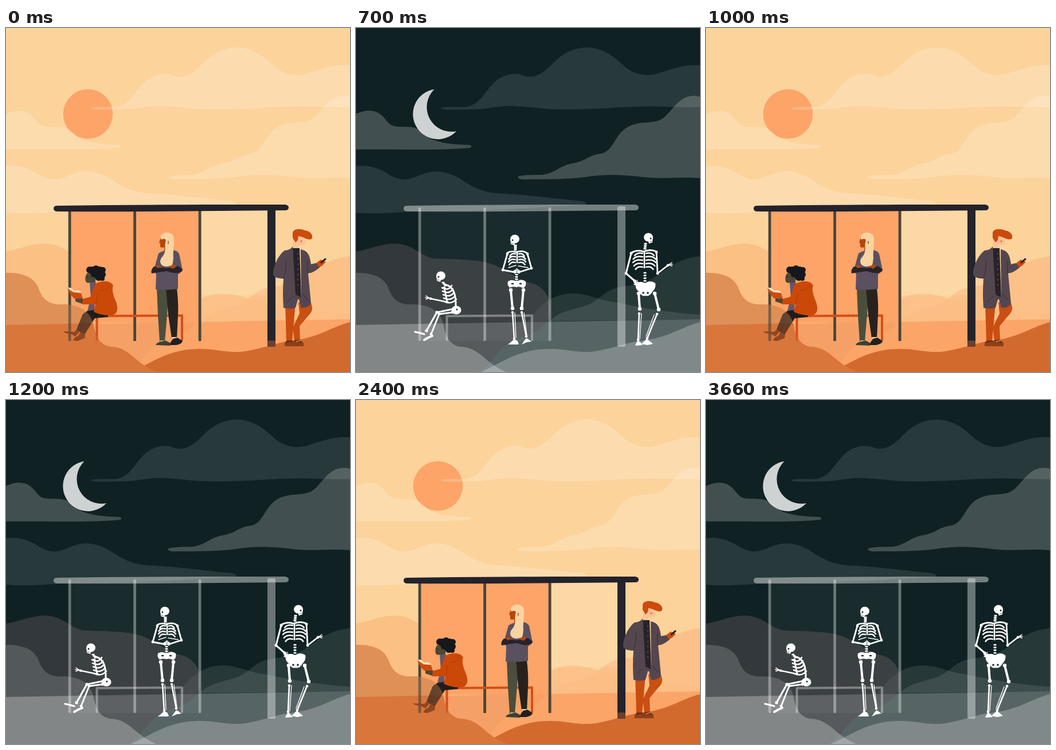
Animation of 600x600 px, one loop 3.76 s. Source, as an HTML page:

```html
<!DOCTYPE html>
<html lang="en">
<head>
<meta charset="utf-8">
<title>Bus stop, day and night</title>
<style>
  html, body { margin: 0; width: 100%; height: 100%; overflow: hidden; background: #fbd39b; }
  svg { display: block; width: 100vw; height: 100vh; }
</style>
</head>
<body>
<svg id="stage" viewBox="0 0 600 600"><g id="day"></g><g id="night"></g></svg>
<script>
const land = {
  cloudA: 'M148 139Q165 137 190 138C215 135 222 115 238 98C252 82 275 76 292 83C312 90 328 78 345 60C365 40 385 34 405 34C435 35 455 55 472 70C490 83 510 85 530 78C555 70 575 63 600 65V138C560 139 530 136 500 137C450 138 420 142 370 142C330 143 300 136 265 136C240 137 225 143 190 142Q148 144 148 139Z',
  cloudB: 'M282 260Q285 256 325 256C348 253 355 240 378 236C402 232 406 221 428 219C448 215 450 190 470 175C490 162 508 167 526 162C545 157 552 132 575 121Q588 116 600 120V262C570 259 540 264 500 260C460 255 430 255 400 260C370 264 330 264 300 264Q282 265 282 260Z',
  cloudC: 'M0 150C15 143 30 142 42 150C55 160 55 172 75 172C90 173 105 170 118 183C130 200 165 203 198 204Q204 206 199 209C150 214 60 211 0 212Z',
  cloudD: 'M0 241C20 238 40 244 55 254C75 267 90 267 110 257C135 247 155 248 180 262C205 278 220 288 260 289C300 291 350 298 395 302Q404 305 401 308C320 313 220 320 120 319C80 320 40 326 0 322Z',
  farLeft: 'M0 390C25 386 45 375 70 376C102 378 112 398 135 402C170 404 205 402 235 411C272 425 280 440 306 445C332 452 340 475 339 495C335 530 295 535 270 548C245 560 240 585 215 600H0Z',
  farRight: 'M338 512C350 496 375 492 395 486C425 478 432 456 460 452C490 448 505 445 525 432C550 414 565 402 600 398V508Z',
  midRight: 'M300 512C320 482 345 463 378 463C405 463 420 474 450 478C500 488 540 496 600 500V508Z',
  ground: 'M0 518L600 508V600H0Z',
  slope: 'M332 513C320 535 295 535 270 548C245 560 240 585 215 600H0V518Z',
  nearLeft: 'M0 427C25 427 47 432 56 452C65 480 82 483 100 482C125 482 146 492 152 515C156 540 165 553 182 556C215 556 225 585 262 600H0Z',
  nearLeftLow: 'M0 518L152 515C156 540 165 553 182 556C215 556 225 585 262 600H0Z',
  front: 'M218 600C255 584 280 562 330 560C360 558 380 566 408 565C440 562 465 550 495 546C545 541 570 520 600 513V600Z'
};

const fill = (d, color, opacity = 1) => `<path d="${d}" fill="${color}" fill-opacity="${opacity}"/>`;
const line = (d, color, width, opacity = 1) =>
  `<path d="${d}" fill="none" stroke="${color}" stroke-width="${width}" stroke-opacity="${opacity}" stroke-linecap="round" stroke-linejoin="round"/>`;
const dot = (x, y, rx, color, ry = rx) =>
  `<ellipse cx="${x}" cy="${y}" rx="${rx}" ry="${ry}" fill="${color}"/>`;
const box = (x, y, w, h, color, opacity = 1, r = 0) =>
  `<rect x="${x}" y="${y}" width="${w}" height="${h}" rx="${r}" fill="${color}" fill-opacity="${opacity}"/>`;
const layers = list => list.map(([name, color, opacity]) => fill(land[name], color, opacity)).join('');

const roof = 'M89 310C220 308 360 308 487 308Q493 309 493 313Q493 318 487 318C360 319 220 321 90 320Q83 320 83 315Q83 310 89 310Z';
const bench = 'M158.500 544V502.500L307 501.500V544';
const posts = [111, 224.500, 338];

// Daytime people
function reader() {
  const skin = '#4b4935', hair = '#17181b', coat = '#cb4908';
  const curls = [[163, 424, 8], [157, 420, 6], [168, 430, 6], [162, 434, 7], [169, 422, 5], [146, 422, 6], [151, 423, 7], [153, 430, 5], [168, 437, 4]];
  return fill('M176 490L146 492Q133 496 131 506L123 526L130 531L147 507L178 504Z', '#1f1c1b')
    + fill('M146 498L130 530L137 535L155 506Z', '#2b1c18')
    + fill('M100 529L119 530L123 526L128 530L121 538L112 533Q102 533 100 529Z', '#6b2c14')
    + fill('M117 545Q119 539 126 537L130 530L138 535L137 541L124 546Z', '#6b2c14')
    + fill('M141 428Q137 435 139 442Q141 446 147 444L149 450L156 446L156 428Z', skin)
    + curls.map(([x, y, r]) => dot(x, y, r, hair)).join('')
    + fill('M146 445L156 443L160 454L155 476L154 492L142 493L148 470Z', '#66566a')
    + fill('M156 446C168 440 182 440 187 449C184 456 187 466 192 478C196 490 195 499 185 501Q166 502 153 495L156 482L133 482L132 473L147 469Z', coat)
    + line('M160 462L157 481M182 449Q176 458 164 458', '#a93b06', 1)
    + fill('M121 471Q126 467 134 472L133 481L121 477Z', skin)
    + fill('M108 453Q114 452 119 458Q127 456 131 461L133 470L119 470Z', '#fce2bd')
    + fill('M107 454L118 461L131 462L134 472L119 472Q111 465 107 454Z', '#c94c10')
    + line('M141 434L143 434', hair, 1);
}

function stander() {
  const skin = '#b4470d', top = '#5a5060', dark = '#26232a';
  return fill('M263 454H284L281 500L277 547H268L265 500Z', '#4b4e3c')
    + fill('M279 454H298Q301 480 300 500L298 541H289L283 500Z', '#28221e')
    + line('M270 546L277 546M290 540L298 540', '#f4c79a', 2)
    + fill('M261 553Q262 549 270 547L278 545L286 549V554Z', '#3d4033')
    + fill('M285 553Q288 545 292 542L299 540L308 546Q307 551 297 553Z', '#221f20')
    + fill('M271 363L267 374L269 376L269 382Q274 384 276 382V392H285V362Z', skin)
    + fill('M266 393Q275 387 288 387Q300 388 302 394L308 423L300 430L300 455Q280 458 261 456L262 430L258 422Z', top)
    + fill('M271 361C277 354 293 355 293 368C293 383 291 392 292 401C291 409 291 416 286 415C274 419 265 411 271 401C281 391 276 383 278 374Q281 365 271 369Q268 365 271 361Z', '#f8d4a2')
    + fill('M258 416L281 419L300 415L308 421Q307 429 291 427L280 424L254 428Q252 422 258 416Z', dark)
    + fill('M261 415Q266 411 272 417L264 419Z', skin)
    + fill('M284 417Q292 410 298 415L292 420Z', skin)
    + line('M283 372V376', skin, 1.500);
}

function phoneMan() {
  const red = '#cd4a0d', coat = '#54464f';
  const buttons = [394, 403, 412, 421, 430, 439, 448].map(y => dot(509, y, .7, '#d8a582')).join('');
  return fill('M487 480H505L499 546H489Z', '#c74d10')
    + fill('M510 478L532 480Q538 492 527 502L512 520L513 545H503L500 523L512 498Z', '#c94f12')
    + fill('M486 555Q485 549 490 545H501L504 555Z', '#702d14')
    + fill('M496 555Q499 548 504 544H513L519 550V555Z', '#702d14')
    + line('M506 547L514 545', '#f0b080', 1.200)
    + fill('M501 361H521L522 374Q522 379 517 378L510 380L509 385L500 385Z', '#fbc294')
    + fill('M500 357C501 350 513 349 521 353C531 354 537 362 533 368C526 371 520 364 510 363L509 370L505 374L500 366Z', red)
    + dot(515, 372, 1.700, '#e87542')
    + fill('M500 384H512L515 475L503 470Z', '#27232a')
    + fill('M500 381Q495 388 486 388C474 397 466 416 466 430Q468 437 484 437Q482 463 484 488Q497 491 505 488L510 470L515 488Q526 489 532 481L527 428Q535 428 548 417L541 410L532 412C530 398 528 389 514 386L515 470L505 465Z', coat)
    + buttons
    + line('M488 407Q490 420 484 436M526 407V428M490 478L500 468M518 465L527 475', '#342c34', 1)
    + fill('M541 410L549 404L558 408L551 415L546 417Z', red)
    + line('M550 409L557 403', '#24222b', 3);
}

// Skeleton parts
const WHITE = '#fff', INK = '#152729';
function limb(points, w) {
  const k = w * .72 + .4;
  return line('M' + points.map(p => p.join(' ')).join('L'), WHITE, w)
    + points.map(([x, y]) => dot(x, y, k, WHITE)).join('');
}
function skull(x, y, dir) {
  return dot(x, y - 1, 8, WHITE, 7.500)
    + fill(`M${x - dir * 2} ${y}L${x + dir * 8} ${y}L${x + dir * 7} ${y + 8}L${x + dir} ${y + 10}Z`, WHITE)
    + dot(x + dir * 4, y + 1, 1.500, INK) + dot(x + dir * 7, y + 3.500, .6, INK)
    + line(`M${x + dir * 2.500} ${y + 7}L${x + dir * 7} ${y + 6}`, INK, .6);
}
function spine(x1, y1, x2, y2, n) {
  let out = '';
  for (let i = 0; i < n; i++) {
    const u = i / (n - 1);
    out += dot(x1 + (x2 - x1) * u, y1 + (y2 - y1) * u, 2.800, WHITE, 1.600);
  }
  return out;
}
// Rows of ribs that bow outward on both sides of the breastbone
function ribs(x, y, w, n, gap) {
  let d = `M${x} ${y - 3}V${y + n * gap - 5}`;
  for (let i = 0; i < n; i++) {
    const top = y + i * gap, r = w * (.84 + .16 * Math.sin(i * .9));
    for (const s of [-1, 1]) d += `M${x + s * 3} ${top}Q${x + s * r * .75} ${top - 2} ${x + s * r} ${top + 4}`;
  }
  return line(d, WHITE, 2.500);
}
const hand = (x, y, dir) =>
  line(`M${x} ${y}l${dir * 6} -4M${x} ${y}l${dir * 7} -1M${x} ${y}l${dir * 6} 2`, WHITE, 1.500);

function sittingBones() {
  const cage = [0, 1, 2, 3, 4].map(i => {
    const x = 150 + i, y = 453 + i * 6;
    return `M${x} ${y}Q${x + 12} ${y + 6} ${x + 17 + i} ${y - 4}`;
  }).join('');
  return skull(148, 433, -1) + spine(152, 444, 156, 449, 3)
    + line('M157 448Q175 452 174 486', WHITE, 3) + line(cage, WHITE, 2.600)
    + limb([[154, 453], [159, 478], [130, 472]], 2.600) + hand(128, 471, -1)
    + dot(175, 492, 8.500, WHITE, 7.500) + dot(176, 491, 1.500, INK)
    + limb([[170, 490], [141, 496], [123, 528]], 3.200) + limb([[168, 496], [145, 499], [131, 534]], 2.800)
    + line('M103 530L112 532L119 534', WHITE, 3.200)
    + line('M119 544L126 540L133 537', WHITE, 3.800);
}

function standingBones() {
  return skull(277, 369, -1) + spine(278, 379, 278, 387, 4)
    + line('M264 392Q272 388 279 391Q291 387 299 393', WHITE, 2.600)
    + ribs(281, 394, 15, 4, 5)
    + limb([[264, 394], [256, 422], [277, 426]], 2.800)
    + limb([[299, 394], [306, 419], [284, 426]], 2.800)
    + hand(275, 424, 1) + hand(286, 424, -1) + line('M266 418L279 414M283 415L300 418', WHITE, 1.600)
    + spine(280, 430, 280, 442, 4)
    + fill('M265 442Q273 437 280 443Q288 436 296 442Q298 449 292 454Q286 450 280 452Q273 450 268 453Q263 448 265 442Z', WHITE)
    + dot(273, 446, 2.400, INK, 1.200) + dot(287, 446, 2.400, INK, 1.200)
    + limb([[270, 457], [273, 489]], 4) + limb([[292, 457], [289, 489]], 4)
    + limb([[273, 496], [276, 542]], 2.600) + limb([[289, 496], [297, 538]], 2.600)
    + line('M277 497L279 540M293 497L298 536', WHITE, 1.300)
    + fill('M265 552Q271 547 276 543L281 545Q285 551 283 552Z', WHITE)
    + fill('M289 552Q293 546 297 541L301 543L306 547L298 548Z', WHITE);
}

function leaningBones() {
  return skull(510, 366, 1) + spine(505, 376, 504, 385, 4)
    + line('M480 392Q491 386 502 390Q514 385 524 390', WHITE, 2.800)
    + ribs(503, 393, 20, 5, 6)
    + limb([[480, 393], [471, 428], [486, 441]], 3) + hand(485, 444, 1) + hand(485, 447, 1)
    + limb([[524, 391], [526, 428], [544, 414]], 2.800) + hand(545, 413, 1)
    + spine(504, 427, 504, 441, 4)
    + fill('M488 446Q495 440 504 445Q514 439 522 445Q524 453 517 460Q512 469 505 467Q498 469 495 461Q486 455 488 446Z', WHITE)
    + dot(501, 462, 1.800, INK) + dot(509, 462, 1.800, INK)
    + limb([[493, 463], [495, 490]], 4) + limb([[521, 463], [528, 491]], 4)
    + limb([[494, 498], [492, 544]], 2.700) + limb([[525, 499], [508, 541]], 2.700)
    + line('M498 498L495 542M520 500L506 538', WHITE, 1.300)
    + fill('M487 554Q489 548 492 545L496 548L500 553Z', WHITE)
    + fill('M498 551Q503 546 507 542L511 545L518 551L508 553Z', WHITE);
}

const leftHills = layers([['nearLeft', '#de9058'], ['nearLeftLow', '#d9763b']]);

document.getElementById('day').innerHTML =
  box(0, 0, 600, 600, '#fbd39b') + dot(143, 150, 43.300, '#fda468')
  + layers([
    ['cloudA', '#fff', .2], ['cloudB', '#fff', .18], ['cloudC', '#fff', .18], ['cloudD', '#fff', .2],
    ['farLeft', '#fbc083'], ['midRight', '#fcc28a'], ['farRight', '#fdbd85', .8], ['ground', '#fca569'], ['slope', '#f5a066']
  ])
  + box(338, 318, 119, 148, '#fff', .1)
  + box(111, 318, 227, 196, '#fda468')
  + layers([['front', '#d26a2e']]) + leftHills
  + posts.map(x => box(x - 2.300, 317, 4.800, 229, '#48463a', 1, 1)).join('')
  + box(456, 316, 14, 240, '#25232b', 1, 2)
  + fill(roof, '#24222b')
  + line(bench, '#d44f18', 4)
  + reader() + stander() + phoneMan()
  + `<g opacity=".35">${leftHills}</g>`
  + box(456, 545, 14, 11, '#d26a2e', .4, 2) + fill('M485 555V550L503 546L519 550V555Z', '#d26a2e', .3);

const night = document.getElementById('night');
night.innerHTML =
  box(0, 0, 600, 600, '#0f2123')
  + fill('M136.500 107A43.700 43.700 0 1 0 175 180A43 43 0 0 1 136.500 107Z', '#cfd2d3')
  + layers([
    ['cloudA', '#f4ffff', .105], ['cloudB', '#fffaf5', .21], ['cloudC', '#fffaf5', .21], ['cloudD', '#f4ffff', .105],
    ['midRight', '#fff', .1], ['farRight', '#fff', .1], ['ground', '#fff', .3],
    ['farLeft', '#575154', .5], ['nearLeft', '#fff', .16], ['nearLeftLow', '#fff', .12], ['front', '#fff', .24]
  ])
  + box(113, 318, 224, 228, '#fff', .045)
  + posts.map(x => box(x - 2.300, 313, 4.800, 233, '#fff', .36, 2)).join('')
  + box(456, 311, 14, 245, '#fff', .38, 3)
  + fill(roof, '#fff', .42)
  + line(bench, '#fff', 4, .34)
  + sittingBones() + standingBones() + leaningBones();

// Moments at which day and night swap
const LOOP = 3760;
const swaps = [0, 500, 600, 700, 800, 900, 1000, 1200, 1400, 1900, 2400, 3400, 3460, 3660];
const steps = swaps.map((ms, i) => ({ offset: ms / LOOP, opacity: i % 2, easing: 'steps(1, end)' }));
night.animate([...steps, { offset: 1, opacity: 1 }], { duration: LOOP, iterations: Infinity });
</script>
</body>
</html>
```
